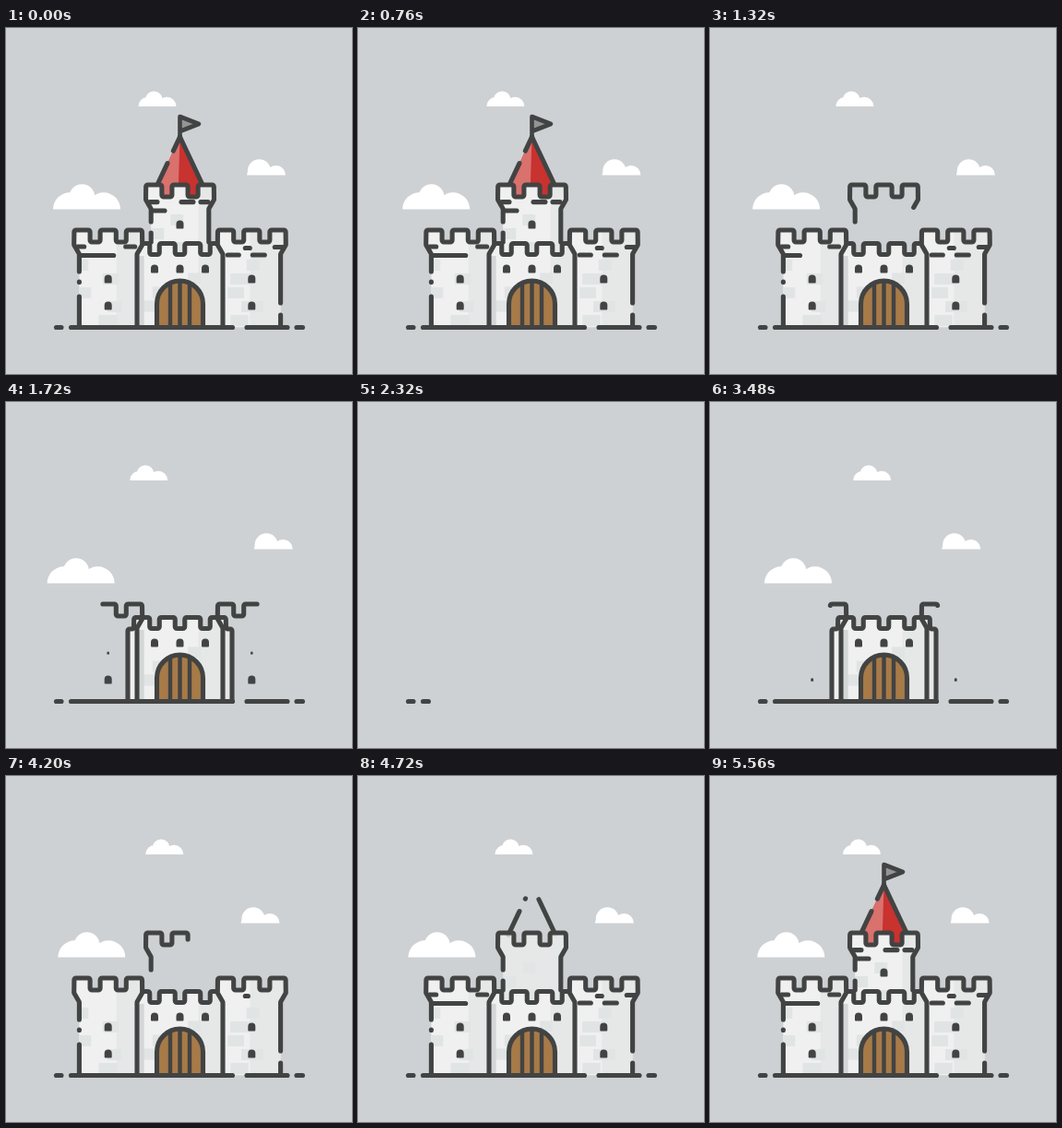
Recreate the animation shown at these times as an HTML page with a canvas. Size 375 by 375 pixels, loop 5640 ms.

```html
<!DOCTYPE html>
<html lang="en">
<head>
<meta charset="utf-8">
<title>Castle</title>
<style>
html, body { margin: 0; width: 100%; height: 100%; overflow: hidden; background: #cdd1d4; }
canvas { display: block; width: 100vw; height: 100vh; }
</style>
</head>
<body>
<canvas id="stage"></canvas>
<script>
const SIZE = 375, LOOP = 5640, MID = 188.5, FLOOR = 324.5;
const SKY = '#cdd1d4', INK = '#424343', STONE = '#f0f0f0', SHADE = '#e6e8e8', BRICK = '#e1e4e4', DARK = '#d3d7d8';
const PEN = 0.3; // drawing speed, px per ms
const canvas = document.getElementById('stage');
const ctx = canvas.getContext('2d');
const ratio = window.devicePixelRatio || 1;
canvas.width = canvas.height = SIZE * ratio;

const clamp = v => Math.max(0, Math.min(1, v));
const span = (t, a, b) => clamp((t - a) / (b - a));
const ease = p => p * p * (3 - 2 * p);

// The castle stands, comes down quickly, then is built again.
function buildTime(t) {
  if (t < 840) return LOOP;
  if (t > 2440) return t;
  return 2440 + 3000 * ((2440 - t) / 1600) ** 1.15;
}

// Small repeatable random generator.
function random(seed) {
  return () => (seed = (seed * 16807) % 2147483647) / 2147483647;
}

function trace(pts, r = 0) {
  ctx.beginPath();
  pts.forEach(([x, y], i) => {
    const next = pts[i + 1];
    if (!i) ctx.moveTo(x, y);
    else if (next && r) ctx.arcTo(x, y, ...next, r);
    else ctx.lineTo(x, y);
  });
}

function fill(pts, color, r) {
  trace(pts, r);
  ctx.fillStyle = color;
  ctx.fill();
}

function rect(x, y, w, h, color) {
  ctx.fillStyle = color;
  ctx.fillRect(x, y, w, h);
}

// Strokes a path as far as the pen has come after `age` ms.
function pen(pts, age, { speed = PEN, r = 0, width = 5.1 } = {}) {
  if (age <= 0) return;
  ctx.lineWidth = width;
  ctx.setLineDash([age * speed, 5000]);
  trace(pts, r);
  ctx.stroke();
  ctx.setLineDash([]);
}

const dash = (x, y, w, age) => pen([[x, y], [x + w, y]], age, { speed: 0.1 });

function faded(alpha, draw) {
  if (alpha <= 0) return;
  ctx.save();
  ctx.globalAlpha = alpha;
  draw();
  ctx.restore();
}

function slit(x, y, p) {
  if (p <= 0) return;
  ctx.save();
  ctx.translate(x, y);
  ctx.scale(p, p);
  ctx.beginPath();
  ctx.roundRect(-4, -4.6, 8, 9.2, [4, 4, 1, 1]);
  ctx.fillStyle = INK;
  ctx.fill();
  ctx.restore();
}

// Row of n merlons centred on cx.
function battlement(cx, top, depth, n, merlon, gap) {
  const pts = [];
  let x = cx - (n * merlon + (n - 1) * gap) / 2;
  for (let i = 0; i < 2 * n - 1; i++) {
    const y = i % 2 ? top + depth : top;
    pts.push([x, y]);
    x += i % 2 ? gap : merlon;
    pts.push([x, y]);
  }
  return pts;
}

function tower(cx, top, left = FLOOR, right = FLOOR) {
  const crown = battlement(cx, top, 13, 3, 17.2, 11);
  const half = 31.3, edge = 37;
  return [
    [cx - half, left], [cx - half, top + 26], [cx - edge, top + 16],
    ...crown,
    [cx + edge, top + 16], [cx + half, top + 26], [cx + half, right]
  ];
}

const SIDE = 77.8, LEFT = MID - SIDE, RIGHT = MID + SIDE;
const gate = [
  [MID - 56.5, FLOOR], [MID - 56.5, 246], [MID - 50, 246],
  ...battlement(MID, 233.5, 12, 4, 17, 10.5),
  [MID + 50, 246], [MID + 56.5, 246], [MID + 56.5, FLOOR]
];
const door = [[MID - 25, FLOOR], [MID - 25, 274], [MID + 25, 274], [MID + 25, FLOOR]];

// Stone fill with a shaded right part and a few random bricks.
function masonry(outline, shadeX, seed) {
  const xs = outline.map(p => p[0]), ys = outline.map(p => p[1]);
  const x0 = Math.min(...xs), w = Math.max(...xs) - x0;
  const top = Math.min(...ys), bottom = Math.max(...ys);
  const rnd = random(seed);
  ctx.save();
  trace(outline);
  ctx.clip();
  rect(x0, top, w, bottom - top, STONE);
  rect(shadeX, top, w, bottom - top, SHADE);
  for (let y = top + 32; y < bottom; y += 15) {
    const width = 14 + 10 * rnd();
    rect(x0 + rnd() * (w - width), y, width, 12, BRICK);
  }
  ctx.restore();
}

// Each cloud: two side bumps and a middle one, sized by its width.
const CLOUDS = [
  { x: 87.5, base: 196.5, w: 73, speed: -3.7, lean: -0.07, lift: 0.185, bump: 0.19 },
  { x: 164, base: 85, w: 41, speed: -5.4, lean: -0.09, lift: 0.17, bump: 0.23 },
  { x: 282, base: 159.5, w: 42, speed: 4.5, lean: -0.18, lift: 0.11, bump: 0.3 }
];

function drawCloud({ x, base, w, speed, lean, lift, bump }, t) {
  const out = t < 2400;
  const s = out ? 1 - ease(span(t, 1920, 2335)) : ease(span(t, 2480, 3000));
  const drift = speed * (out ? t : t - LOOP) / 1000;
  ctx.save();
  ctx.translate(x + drift, base - w * 0.18);
  ctx.scale(w * s, w * s);
  ctx.translate(0, 0.18);
  ctx.beginPath();
  ctx.rect(-1, -1, 2, 1);
  ctx.clip();
  ctx.beginPath();
  for (const [cx, cy, r] of [[-0.25, 0, 0.25], [lean, -lift, bump], [0, 0, 0.2], [0.25, 0, 0.25]]) {
    ctx.moveTo(cx + r, cy);
    ctx.arc(cx, cy, r, 0, Math.PI * 2);
  }
  ctx.fillStyle = '#fff';
  ctx.fill();
  ctx.restore();
}

function drawRoof(b) {
  const tip = [MID, 118], eaves = 172;
  const slope = (side, p) => [MID + side * 25.5 * p, tip[1] + (eaves - tip[1]) * p];
  faded(span(b, 4880, 5060), () => {
    fill([tip, slope(1, 1), [MID + 25, 182], [MID - 25, 182], slope(-1, 1)], '#c8322f');
    fill([tip, [MID - 2, 182], [MID - 25, 182], slope(-1, 1)], '#d9716d');
  });
  pen([slope(1, 1), tip], b - 4580);
  pen([slope(-1, 1), slope(-1, 0.53)], b - 4580);
  pen([slope(-1, 0.28), tip], b - 4720);
  const flag = [tip, [MID, 96], [209, 104], [MID, 112]];
  faded(span(b, 5140, 5300), () => fill(flag.slice(1), '#939596'));
  pen(flag, b - 4880, { width: 4.6 });
}

function drawKeep(b) {
  faded(span(b, 4560, 4780), () => masonry(tower(MID, 170, 245, 245), MID + 20, 11));
  pen(tower(MID, 170, 210, 232), b - 3825, { r: 2 });
  pen([[MID - 31.3, 222], [MID - 31.3, 232]], b - 4560);
  const age = b - 4900;
  dash(159, 198, 13, age);
  dash(156, 188.6, 8, age);
  dash(190, 188.6, 13, age);
  dash(211, 188.6, 8, age);
  slit(MID, 213, ease(span(b, 4900, 5080)));
}

function drawGate(b) {
  faded(span(b, 3080, 3260), () => {
    masonry(gate, MID + 20, 5);
    rect(LEFT + 32, 247, 7, FLOOR - 247, DARK);
  });
  pen(gate, b - 2700, { speed: 0.7, r: 2 });
  faded(span(b, 3100, 3260), () => fill(door, '#a77a48', 25));
  for (const i of [-1, 0, 1]) {
    const x = MID + 10.5 * i, lag = 50 * i;
    pen([[x, FLOOR], [x, 275 + 3 * Math.abs(i)]], b - 3030 - lag, { width: 4.4 });
    slit(MID + 27.5 * i, 261, ease(span(b, 3210 + lag, 3370 + lag)));
  }
  pen(door, b - 2860, { speed: 0.4, r: 25 });
}

function drawTowers(b) {
  faded(span(b, 3880, 4100), () => {
    masonry(tower(LEFT, 219), LEFT + 9, 23);
    masonry(tower(RIGHT, 219), RIGHT - 2, 42);
  });

  // Outer walls stop early and go on below a gap.
  const outer = 31.3, age = b - 3070;
  pen(tower(LEFT, 219, 264).reverse(), age, { r: 2 });
  pen(tower(RIGHT, 219, FLOOR, 298), age, { r: 2 });
  pen([[LEFT - outer, 275], [LEFT - outer, 275.5]], age - 980);
  pen([[LEFT - outer, 291], [LEFT - outer, FLOOR]], age - 1010);
  pen([[RIGHT + outer, 311], [RIGHT + outer, FLOOR]], age - 1080);

  const late = b - 4260;
  dash(LEFT - 30, 246.5, 36, late);
  dash(LEFT - 33, 237, 7, late);
  dash(LEFT + 19, 237, 10, late);
  dash(RIGHT - 26, 246, 12, late);
  dash(RIGHT + 1, 246, 13, late);
  dash(RIGHT + 25, 237.5, 9, late);
  dash(RIGHT - 7, 238.5, 5, late + 90);

  for (const x of [LEFT, RIGHT]) {
    slit(x, 301, ease(span(b, 3400, 3600)));
    slit(x, 272, ease(span(b, 3560, 3760)));
  }
}

function drawGround(b) {
  const end = 54.5 + 267 * span(b, 2550, 3050);
  if (b <= 2550) return;
  for (const [x, to] of [[54.5, 60], [70.5, 245.5], [261, 305], [315, 321.5]]) {
    if (end > x) pen([[x, FLOOR], [Math.min(to, end), FLOOR]], LOOP);
  }
}

function draw(t) {
  const b = buildTime(t);
  ctx.setTransform(ratio, 0, 0, ratio, 0, 0);
  rect(0, 0, SIZE, SIZE, SKY);
  ctx.strokeStyle = INK;
  ctx.lineCap = ctx.lineJoin = 'round';
  CLOUDS.forEach(c => drawCloud(c, t));
  drawRoof(b);
  drawKeep(b);
  drawGate(b);
  drawTowers(b);
  drawGround(b);
}

const start = performance.now();
function tick() {
  draw((performance.now() - start) % LOOP);
  requestAnimationFrame(tick);
}
tick();
</script>
</body>
</html>
```
